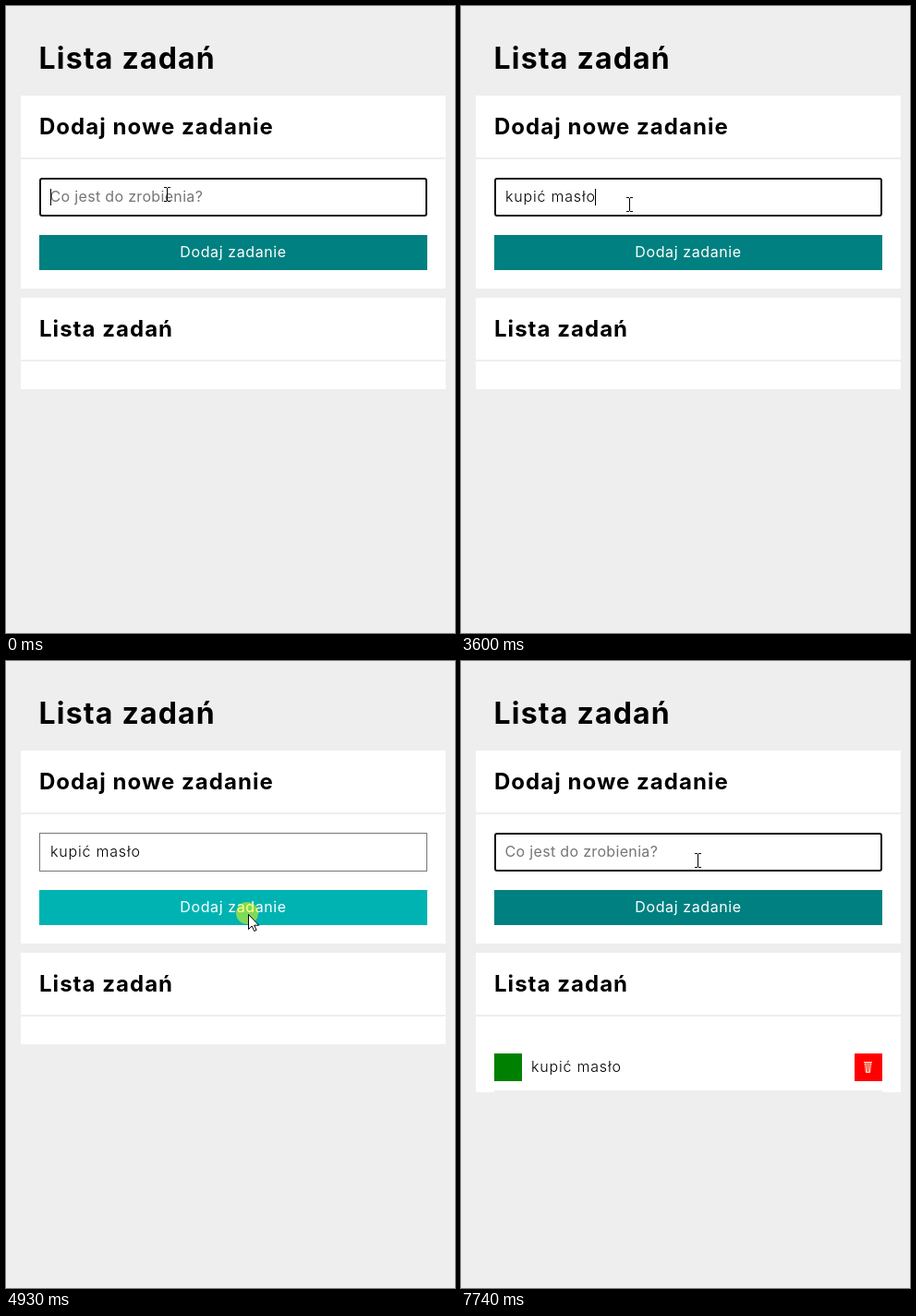
These frames come from a looping animation (486 px wide and 679 px high, 8000 ms). An HTML page:

```html
<!DOCTYPE html>
<html lang="pl">
<head>
<meta charset="utf-8">
<title>Lista zadań</title>
<style>
  html, body { margin: 0; width: 100%; height: 100%; overflow: hidden; background: #eee; }
  svg { display: block; width: 100%; height: 100%; }
  text { font: 400 16px Inter, "Open Sans", sans-serif; font-optical-sizing: none; letter-spacing: .6px; white-space: pre; }
  .title { font-size: 32px; font-weight: 700; letter-spacing: .0375em; }
  .heading { font-size: 24px; font-weight: 700; letter-spacing: .043em; }
  .hint { fill: #757575; letter-spacing: .33px; }
  .value { font-weight: 300; letter-spacing: .8px; }
  .panel { fill: #fff; }
  .line { fill: #eee; }
</style>
</head>
<body>
<svg viewBox="0 0 486 679">
  <rect width="486" height="679" fill="#eee"/>
  <text class="title" x="35.5" y="68">Lista zadań</text>

  <rect class="panel" x="16" y="97" width="460" height="209"/>
  <rect class="line" x="16" y="164" width="460" height="2"/>
  <text class="heading" x="36" y="139">Dodaj nowe zadanie</text>
  <rect id="blurred" x="36.5" y="186.5" width="419" height="41" fill="#fff" stroke="#767676"/>
  <rect id="focused" x="37" y="187" width="418" height="40" rx="2" fill="#fff" stroke="#101010" stroke-width="2"/>
  <text id="hint" class="hint" x="47.5" y="212">Co jest do zrobienia?</text>
  <text id="value" class="value" x="48" y="212"></text>
  <rect id="caret" x="48" y="198" width="1" height="18"/>
  <rect id="button" x="36" y="248" width="420" height="38"/>
  <text x="246" y="272" fill="#fff" text-anchor="middle">Dodaj zadanie</text>

  <rect id="list" class="panel" x="16" y="316" width="460" height="99"/>
  <rect class="line" x="16" y="383" width="460" height="2"/>
  <text class="heading" x="36" y="358">Lista zadań</text>
  <g id="task">
    <rect x="36" y="425" width="30" height="30" fill="#008000"/>
    <text class="value" x="76" y="445">kupić masło</text>
    <rect x="426" y="425" width="30" height="30" fill="#f00"/>
    <path d="M436 434.5h9M436.5 436h8M437.5 436l.8 9.5h4.4l.8-9.5M439.5 437v8M441.5 437v8" fill="none" stroke="#ffe6c8"/>
    <rect class="line" x="36" y="465" width="420" height="2"/>
  </g>

  <circle id="press" cx="261" cy="273" r="12" fill="#ff0" fill-opacity=".5"/>
  <path id="arrow" d="M.5.5v16l3.7-3.5 2.5 5.5 2.4-1.1-2.4-5.2h5z" fill="#fff" stroke="#000"/>
  <path id="beam" d="M-3-8h3v1h1v-1h3v1H1V7h3v1H1V7H0v1h-3V7h3V-7h-3z"/>
</svg>
<script>
const LOOP = 8000, BLINK = 530, PRESS = 4930, RELEASE = 5060;

// Each burst of typing has its own start and rhythm
const bursts = [
  { text: "kup", start: 1480, every: 200 },
  { text: "ić ", start: 2080, every: 287 },
  { text: "masło", start: 2940, every: 165 }
];
const keys = bursts.flatMap(b => [...b.text].map((letter, i) => ({ letter, time: b.start + i * b.every })));

// The pointer rests between glides
const home = [174, 204];
const glides = [
  { start: 60, length: 200, to: [187, 242] },
  { start: 260, length: 340, to: [182, 215] },
  { start: 4070, length: 400, to: [257, 288] },
  { start: 4470, length: 260, to: [262, 274] },
  { start: 5300, length: 310, to: [261, 252] },
  { start: 5610, length: 330, to: [255, 218] },
  { start: 6640, length: 100, to: [261, 218] },
  { start: 6740, length: 210, to: [256, 216] }
];

const el = id => document.getElementById(id);
const show = (id, on) => el(id).setAttribute("visibility", on ? "visible" : "hidden");
const inside = (v, from, to) => v >= from && v < to;
const clamp01 = v => Math.min(1, Math.max(0, v));

function pointerAt(t) {
  return glides.reduce((from, { start, length, to }) => {
    const progress = clamp01((t - start) / length);
    return from.map((v, i) => v + (to[i] - v) * progress);
  }, home).map(Math.round);
}

function buttonColor(pressed, y) {
  if (pressed) return "#00b3b3";
  return inside(y, 248, 286) ? "#009999" : "#008080";
}

function drawInput(t, pressed, added) {
  const typed = keys.filter(k => k.time <= t);
  const value = added ? "" : typed.map(k => k.letter).join("");
  el("value").textContent = value;
  show("hint", !value);
  show("focused", !pressed);
  show("blurred", pressed);

  const lastReset = added ? RELEASE + 20 : typed.length ? typed[typed.length - 1].time : -260;
  const phase = Math.floor(Math.max(0, t - lastReset) / BLINK);
  const width = value ? el("value").getComputedTextLength() : 0;
  el("caret").setAttribute("x", 48 + Math.floor(width));
  show("caret", !pressed && phase % 2 === 0);
}

function drawPointer(t, pressed) {
  const [x, y] = pointerAt(t);
  const overInput = inside(y, 186, 228);
  for (const id of ["arrow", "beam"]) el(id).setAttribute("transform", `translate(${x} ${y})`);
  show("arrow", !overInput);
  show("beam", overInput);
  show("press", pressed);
  el("button").setAttribute("fill", buttonColor(pressed, y));
}

function draw(t) {
  const pressed = inside(t, PRESS, RELEASE);
  const added = t >= RELEASE;
  drawInput(t, pressed, added);
  drawPointer(t, pressed);
  el("list").setAttribute("height", added ? 151 : 99);
  show("task", added);
}

function tick() {
  draw(performance.now() % LOOP);
  requestAnimationFrame(tick);
}
tick();
</script>
</body>
</html>
```
